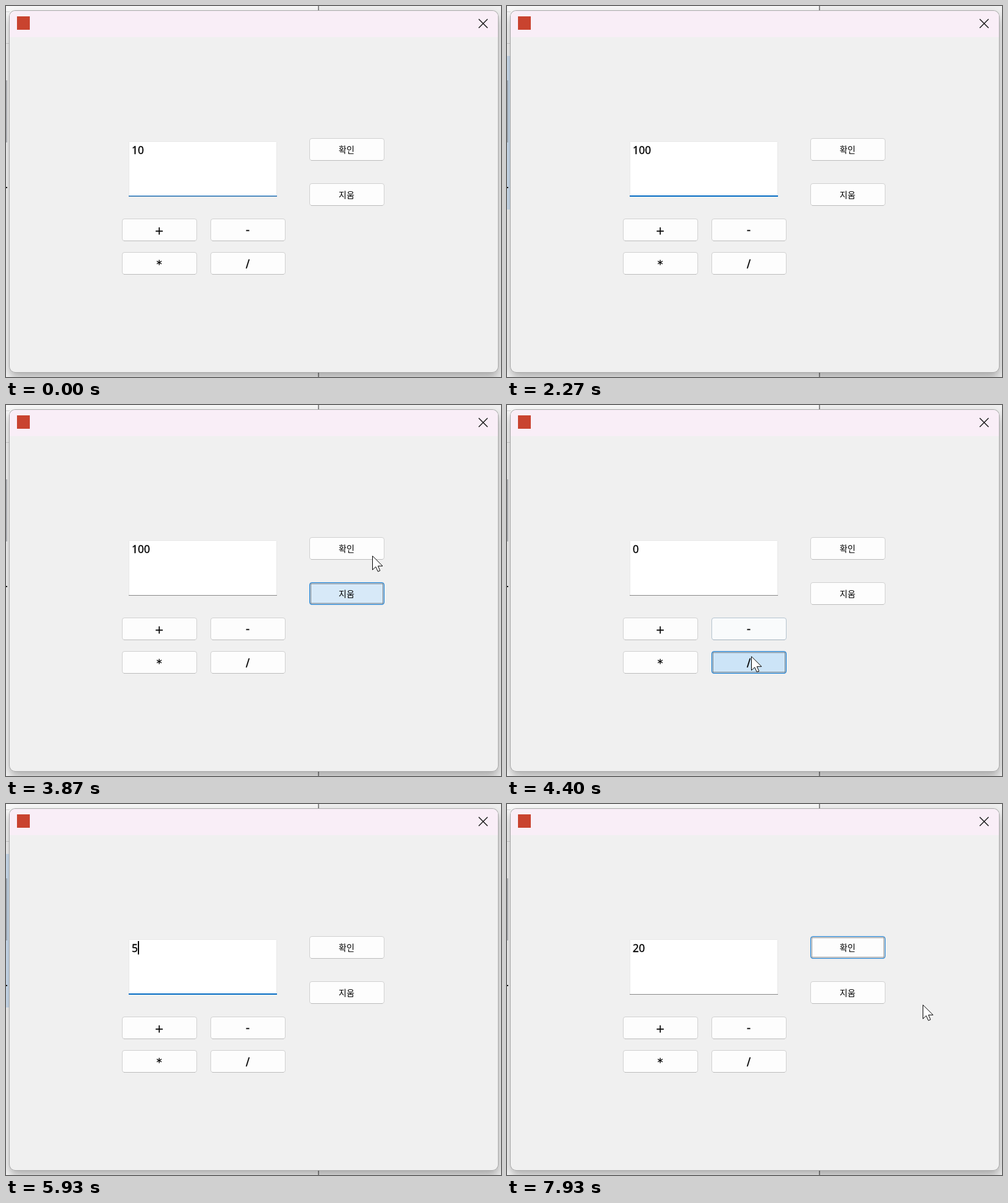
These frames come from a looping animation (811 by 609 pixels, 8 s). An HTML page:

```html
<!DOCTYPE html>
<html lang="ko">
<head>
<meta charset="utf-8">
<title>Calculator</title>
<style>
html, body { margin: 0; width: 100%; height: 100%; overflow: hidden; background: #f0f0f0; }
svg { display: block; width: 811px; height: 609px; }
.num { font: 17.4px "Noto Sans", "Open Sans", sans-serif; stroke-width: .35px; }
.label { font: 14px "Noto Sans CJK KR", "Noto Sans CJK", sans-serif; }
.op { font: 18px "DejaVu Sans", sans-serif; stroke: #000; stroke-width: .35px; }
</style>
</head>
<body>
<svg viewBox="0 0 811 609" xmlns="http://www.w3.org/2000/svg">
  <defs>
    <filter id="shadow" x="-10%" y="-10%" width="120%" height="120%">
      <feDropShadow dx="0" dy="8" stdDeviation="8" flood-opacity=".3"/>
    </filter>
    <clipPath id="frame"><rect x="6" y="8" width="800" height="593" rx="9"/></clipPath>
  </defs>

  <!-- windows behind the dialog -->
  <rect width="512" height="609" fill="#f9f9f9"/>
  <rect x="512" width="299" height="609" fill="#f0f0f0"/>
  <rect x="511" width="2" height="609" fill="#8c8c8c"/>
  <path d="M0 9.5H6M0 61.5H6" stroke="#d4d4d4"/>
  <rect id="strip" y="82" width="6" height="252" fill="#d3e6f8"/>
  <rect y="122" width="2" height="102" fill="#8a8f96" opacity=".55"/>
  <rect y="297" width="2" height="2" fill="#111"/>

  <!-- dialog -->
  <rect x="5" y="7" width="802" height="595" rx="10" fill="#a8a8a8" filter="url(#shadow)"/>
  <g clip-path="url(#frame)">
    <rect x="6" y="8" width="800" height="594" fill="#f0f0f0"/>
    <rect x="6" y="8" width="800" height="43" fill="#f9eef7"/>
  </g>
  <rect x="18" y="17" width="21" height="22" fill="#c9432f"/>
  <path d="M774.5 21.5L789 36M789 21.5L774.5 36" stroke="#1b1b1b" stroke-width="1.5"/>

  <!-- edit box -->
  <rect x="201.5" y="222.5" width="242" height="90" rx="1" fill="#fff" stroke="#e8e8e8"/>
  <rect id="lineTop" x="201" y="311" width="243" height="1" fill="#0067c0"/>
  <rect id="lineLow" x="201" y="312" width="243" height="1"/>
  <rect id="mark" x="206" y="225" height="22" fill="#0078d7"/>
  <text id="value" class="num" x="206" y="243"></text>
  <rect id="caret" y="225" width="2" height="22"/>

  <g id="buttons"></g>

  <path id="arrow" d="M.5 .8V23.6L5.8 18.6L9.4 26.4L12.9 24.9L9.5 17.3H17Z" fill="#fff" stroke="#000" stroke-linejoin="round"/>
  <path id="beam" d="M-7 -12H-2Q0 -12 0 -10Q0 -12 2 -12H7M0 -10V10M-7 12H-2Q0 12 0 10Q0 12 2 12H7" fill="none" stroke="#000" stroke-width="2"/>
</svg>
<script>
const TICK = 200 / 3, FRAMES = 120, LOOP = TICK * FRAMES, BLINK = 530;
const PLAIN = [253, 253, 253], HOT = [224, 238, 249], DOWN = [204, 228, 247];
const EDGE = [208, 208, 208], FOOT = [187, 187, 187], GREY = [134, 134, 134], BLUE = [0, 108, 198];

// What the user does: mouse trips (time, x, y), mouse holds, and the text that results.
const trips = [
  [[133, -10, 290], [470, 605, 300], [600, 470, 404], [733, 330, 245], [940, -20, 250]],
  [[2333, -10, 280], [2867, 545, 320], [3267, 562, 318], [3700, 562, 318], [3867, 600, 247],
   [4333, 400, 412], [4400, 400, 412], [4667, 313, 269], [4870, -10, 255]],
  [[5933, -20, 280], [6533, 555, 228], [6667, 565, 227], [6867, 566, 227], [7070, 703, 270]],
  [[7930, 681, 329], [LOOP, 681, 329]]
];
const holds = [[720, 940], [3430, 3700], [4330, 4410], [4710, 4900], [6660, 6860]];
const texts = [[0, '10'], [1390, '1'], [1590, '10'], [1730, '100'], [4390, '0'], [5390, ''], [5460, '5'], [6860, '20']];

const edit = { x: 201, y: 222, w: 243, h: 91 };
const button = (x, y, text, base, cls) => ({ x, y, w: 123, h: 37, text, base, cls });
const buttons = [
  button(497, 217, '확인', 24, 'label'),
  button(497, 291, '지움', 24, 'label'),
  button(190, 349, '+', 25.5, 'op'),
  button(335, 349, '-', 24, 'op'),
  button(190, 404, '*', 26, 'op'),
  button(335, 404, '/', 25, 'op')
];

const $ = id => document.getElementById(id);
const show = (el, on) => el.setAttribute('visibility', on ? 'visible' : 'hidden');
const lerp = (a, b, k) => a + (b - a) * k;
const blend = (a, b, k) => a.map((v, i) => Math.round(lerp(v, b[i], k)));
const rgb = c => `rgb(${c})`;
const inside = (p, r) => p[0] >= r.x && p[0] < r.x + r.w && p[1] >= r.y && p[1] < r.y + r.h;

// Moves a 0..1 level one tick on or off, with its rise and fall in ms.
const ease = (v, on, rise, fall) => on ? Math.min(1, v + TICK / rise) : Math.max(0, v - TICK / fall);

function pointer(t) {
  for (const trip of trips) {
    for (let i = 1; i < trip.length; i++) {
      const [t0, x0, y0] = trip[i - 1], [t1, x1, y1] = trip[i];
      if (t < t0 || t > t1) continue;
      const k = (t - t0) / (t1 - t0);
      return [lerp(x0, x1, k), lerp(y0, y1, k)].map(Math.round);
    }
  }
  return null;
}

// Plays the user's actions once and keeps the state at every tick.
function simulate() {
  const frames = [];
  const levels = buttons.map(() => ({ hot: 0, down: 0, glow: 0 }));
  let focus = edit, line = .6, text = '', lastKey = 0;
  let held = false, selected = false, stripHot = false;

  for (let i = 0; i < FRAMES; i++) {
    const t = i * TICK;
    const at = pointer(t);
    const over = at && [edit, ...buttons].find(r => inside(at, r));
    const hold = holds.some(([a, b]) => t >= a && t < b);
    if (hold && !held && over) focus = over;
    held = hold;

    const now = texts.filter(v => v[0] <= t).pop()[1];
    if (now !== text) {
      lastKey = i ? t : -BLINK;
      selected = false;
      text = now;
    }
    const drag = held && focus === edit;
    if (drag && at && at[0] < 216) selected = true;
    if (at) stripHot = at[0] < 10;

    const lit = Math.floor((t - lastKey) / BLINK) % 2 === 0;
    frames.push({
      at, text, selected, stripHot, line,
      beam: drag || over === edit,
      caret: focus === edit && !selected && lit,
      levels: levels.map(l => ({ ...l }))
    });

    line = ease(line, focus === edit, 150, 230);
    buttons.forEach((b, n) => {
      const l = levels[n];
      l.hot = ease(l.hot, over === b && !drag, 100, 250);
      l.down = ease(l.down, held && focus === b, 60, 350);
      l.glow = ease(l.glow, focus === b, 60, 60);
    });
  }
  return frames;
}

function make(tag, attrs, parent) {
  const el = document.createElementNS('http://www.w3.org/2000/svg', tag);
  for (const k in attrs) el.setAttribute(k, attrs[k]);
  parent.appendChild(el);
  return el;
}

for (const b of buttons) {
  const g = make('g', { transform: `translate(${b.x} ${b.y})` }, $('buttons'));
  b.face = make('rect', { x: .5, y: .5, width: 122, height: 36, rx: 3.5 }, g);
  b.foot = make('path', { d: 'M3 36.5H120' }, g);
  b.dots = make('rect', { x: 2.5, y: 2.5, width: 118, height: 32, fill: 'none', stroke: '#111', 'stroke-dasharray': '1 1' }, g);
  make('text', { x: 61, y: b.base, 'text-anchor': 'middle', class: b.cls }, g).textContent = b.text;
}

function drawButton(b, { hot, down, glow }) {
  const lit = Math.max(hot, down, glow);
  b.face.setAttribute('fill', rgb(blend(blend(PLAIN, HOT, hot), DOWN, down)));
  b.face.setAttribute('stroke', rgb(blend(EDGE, BLUE, lit)));
  b.foot.setAttribute('stroke', rgb(blend(FOOT, BLUE, lit)));
  b.dots.setAttribute('opacity', glow);
}

function drawEdit(s) {
  const width = s.text.length * 10;
  const ink = s.selected ? '#fff' : '#000';
  $('value').textContent = s.text;
  $('value').setAttribute('fill', ink);
  $('value').setAttribute('stroke', ink);
  $('mark').setAttribute('width', width);
  show($('mark'), s.selected);
  $('caret').setAttribute('x', 206 + width);
  show($('caret'), s.caret);
  $('lineTop').setAttribute('opacity', s.line);
  $('lineLow').setAttribute('fill', rgb(blend(GREY, BLUE, s.line)));
}

function drawPointer(s) {
  show($('arrow'), s.at && !s.beam);
  show($('beam'), s.at && s.beam);
  if (s.at) for (const id of ['arrow', 'beam']) $(id).setAttribute('transform', `translate(${s.at})`);
}

const frames = simulate();

function draw(ms) {
  const s = frames[Math.min(FRAMES - 1, Math.floor((ms % LOOP + 5) / TICK))];
  show($('strip'), s.stripHot);
  drawEdit(s);
  buttons.forEach((b, n) => drawButton(b, s.levels[n]));
  drawPointer(s);
}

let start;
function loop(now) {
  if (start === undefined) start = now;
  draw(now - start);
  requestAnimationFrame(loop);
}
draw(0);
requestAnimationFrame(loop);
</script>
</body>
</html>
```
